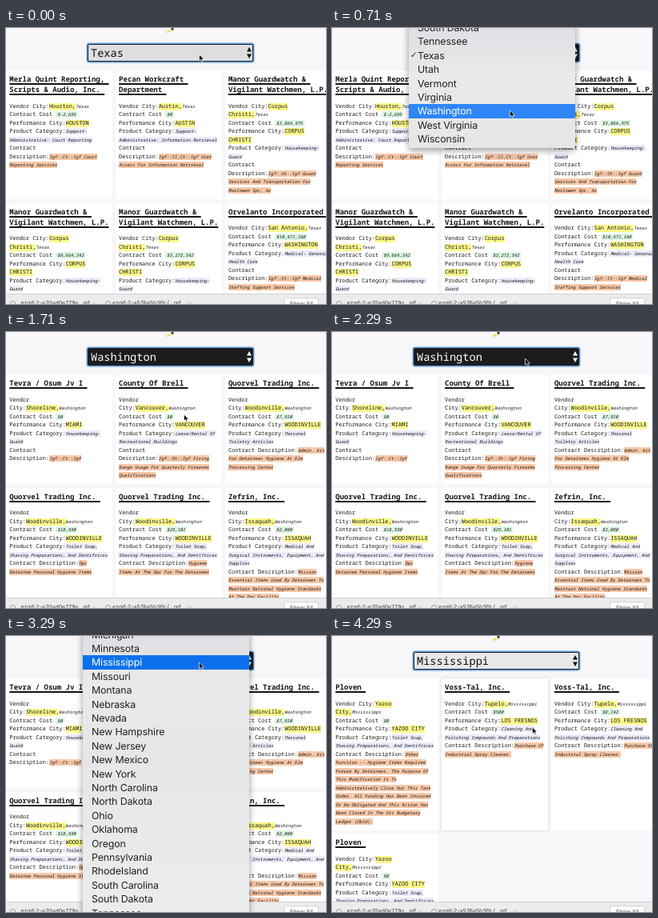
An HTML page for the animation above (4.44 s loop, 400 px wide and 345 px high).

```html
<!DOCTYPE html>
<html lang="en">
<head>
<meta charset="utf-8">
<title>Contracts by state</title>
<style>
html, body { margin: 0; width: 100%; height: 100%; overflow: hidden; }
body { position: relative; background: #f8f6f8; color: #161616; text-rendering: geometricPrecision; }
#stage { position: absolute; width: 400px; height: 345px; overflow: hidden; }
#stage div, #stage svg { position: absolute; }
#select { left: 102px; top: 20px; width: 205px; height: 20px; border: 1px solid #222; border-radius: 2px;
  box-shadow: 0 0 0 1.5px #5b9fde; font: 500 13.65px/20px "Noto Sans Mono", monospace; }
#select span { position: absolute; left: 3px; }
#select svg { left: 197px; top: 3px; }
.card { width: 128.5px; padding: 4px 0 0 4.3px; background: #fff; white-space: pre;
  font: 500 6.9px/10.5px "Noto Sans Mono", monospace; }
.card.lifted { box-shadow: 0 0 4px #0002; }
.card b { display: block; margin-bottom: 10.75px; font-size: 9px; font-weight: 600; line-height: 13px;
  text-decoration: underline 1.5px; text-underline-offset: 1.8px; text-decoration-skip-ink: none; }
.card span, .card i { line-height: 0; }
.card span { background: #fdf88c; }
.card i { font-size: 5.52px; }
.card .cost { background: #dcf6e2; padding: 0 2px; }
.card .kind { background: #ebebfa; }
.card .about { background: #f9c8a8; }
#bar { left: 0; top: 333px; width: 400px; height: 12px; background: #ececec; box-shadow: 0 -1px #d2d2d2;
  font: 7px/10px Inter, sans-serif; color: #444; }
#bar div { top: 6px; white-space: pre; }
#bar .button { left: 348px; top: 5px; width: 42px; height: 12px; border-radius: 2px; background: #fff;
  box-shadow: 0 0 0 .5px #bbb; text-align: center; line-height: 13px; }
#bar .file { left: 5px; width: 5px; height: 5px; top: 8px; border: 1px solid #999; border-radius: 50%; }
#menu { left: 96px; top: 0; width: 208px; overflow: hidden; border-radius: 0 0 4px 4px;
  background: linear-gradient(#dfdfe4, #eaeaeb 60px, #e6e6e7 150px, #ebedec 345px);
  font: 12.4px/17.4px Inter, sans-serif; letter-spacing: -.14px; color: #222; }
#shade { left: 96px; top: -10px; width: 208px; border-radius: 4px; box-shadow: 0 3px 9px #0006; }
#list div { left: 0; width: 197px; height: 17.4px; padding-left: 11px; white-space: pre; }
#list .hot { background: #0c70ee; color: #fff; }
#menu.bright .hot { background: #2e86f8; }
#list .checked::before { content: "✓"; position: absolute; left: 2px; font: 10px/17.4px "DejaVu Sans", sans-serif; }
#menu.blank #list div { color: transparent; }
</style>
</head>
<body>
<div id="stage">
  <svg width="12" height="8" style="left:200px;top:0"><path d="M1 5.5 6 3" stroke="#f2dc3c" stroke-width="2"/><path d="M6 0h4L8 4Z" fill="#333"/></svg>
  <div id="select"><span></span><svg width="8" height="14" fill="currentColor"><path d="M1 5.5 4 0l3 5.5ZM1 8.5h6L4 14Z"/></svg></div>
  <div id="pages"></div>
  <div id="bar">
    <div class="file"></div><div style="left:18.5px">ezgif-2-e70ad0e779s...gif</div><div style="left:107px">···</div>
    <div class="file" style="left:124px"></div><div style="left:133px">ezgif-2-a576a5b3fb (...gif</div><div style="left:226px">···</div>
    <div class="button">Show All</div>
  </div>
  <div id="shade"></div>
  <div id="menu"><div id="list"></div></div>
  <svg id="cursor" width="9" height="12" style="left:0;top:0;overflow:visible"><path d="M0 0V8L1.9 6.4 3.2 9.3 4.6 8.7 3.3 5.9H5.8Z" stroke="#fff" stroke-width=".7"/></svg>
</div>
<script>
const $ = id => document.getElementById(id);
const ROW = 17.4;
const states = ("Michigan,Minnesota,Mississippi,Missouri,Montana,Nebraska,Nevada,New Hampshire,New Jersey,New Mexico," +
  "New York,North Carolina,North Dakota,Ohio,Oklahoma,Oregon,Pennsylvania,RhodeIsland,South Carolina," +
  "South Dakota,Tennessee,Texas,Utah,Vermont,Virginia,Washington,West Virginia,Wisconsin").split(",");

const guards = "Manor Guardwatch & \nVigilant Watchmen, L.P.";
const trader = "Quorvel Trading Inc. ";
const soap = "Toilet Soap,\nShaving Preparations, And Dentifrices";
const polish = "Cleaning And\nPolishing Compounds And Preparations";
const guarding = "Housekeeping-\nGuard";
const prison = ["Ploven ", "Yazoo\nCity", "0", "YAZOO CITY", soap,
  "Other\nFunction -- Hygiene Items Required\nForuse By Detainees. The Purpose Of\nThis Modification Is To\n" +
  "Administratively Close Out This Task\nOrder. All Funding Has Been Invoiced\nOr De-Obligated And This Action Has\n" +
  "Been Closed In The Orv Budgetary\nLedger (Obld)."];

// Card fields: title, vendor city, cost, performance city, category, description.
// A leading line break in a value moves the break into its label.
const pages = [
  { state: "Texas", second: 218.5, cards: [
    ["Merla Quint Reporting, \nScripts & Audio, Inc. ", "Houston", "-2,695", "HOUSTON",
      "Support-\nAdministrative: Court Reporting", "\nIgf::Ct::Igf Court\nReporting Services"],
    ["Pecan Workcraft \nDepartment ", "Austin", "0", "AUSTIN",
      "Support-\nAdministrative: Information Retrieval", "\nIgf::Cl,Ct::Igf User\nAccess For Information Retrieval"],
    [guards, "Corpus\nChristi", "3,864,975", "CORPUS\nCHRISTI", guarding,
      "\nIgf::Ot::Igf Guard\nServices And Transportation For\nMarlowen Spc, Az"],
    [guards, "Corpus\nChristi", "9,664,342", "CORPUS\nCHRISTI", guarding, "\nIgf::Ot::Igf"],
    [guards, "Corpus\nChristi", "3,272,542", "CORPUS\nCHRISTI", guarding, "\nIgf::Ot::Igf"],
    ["Orvelanto Incorporated ", "San Antonio", "10,471,160", "WASHINGTON", "Medical- General\nHealth Care",
      "\nIgf::Ct::Igf Medical\nStaffing Support Services"]] },
  { state: "Washington", second: 194.5, cards: [
    ["Tevra / Osum Jv I ", "\nShoreline", "0", "MIAMI", guarding, "\nIgf::Ct::Igf"],
    ["County Of Brell ", "\nVancouver", "0", "VANCOUVER", "Lease/Rental Of\nRecreational Buildings",
      "\nIgf::Ot::Igf Firing\nRange Usage For Quarterly Firearms\nQualifications"],
    [trader, "\nWoodinville", "7,910", "WOODINVILLE", "Personal\nToiletry Articles",
      "Admin. Kit\nFor Detainees Hygiene At Dlm\nProcessing Center"],
    [trader, "\nWoodinville", "18,930", "WOODINVILLE", soap, "Dpc\nDetainee Personal Hygiene Items"],
    [trader, "\nWoodinville", "29,101", "WOODINVILLE", soap, "Hygiene\nItems At The Dpc For The Detainees"],
    ["Zefrin, Inc. ", "\nIssaquah", "2,080", "ISSAQUAH",
      "Medical And\nSurgical Instruments, Equipment, And\nSupplies",
      "Mission\nEssential Items Used By Detainees To\nMaintain National Hygiene Standards\nAt The Dpc Facility"]] },
  { state: "Mississippi", second: 247, cards: [
    prison,
    ["Voss-Tal, Inc. ", "Tupelo", "500", "LOS FRESNOS", polish, "Purchase Of\nIndustrial Spray Cleaner."],
    ["Voss-Tal, Inc. ", "Tupelo", "8,142", "LOS FRESNOS", polish, "Purchase Of\nIndustrial Spray Cleaner."],
    prison] }
];

const label = (first, last, value) => first + (value[0] === "\n" ? "\n" : " ") + last + ":";

function cardHTML({ state, second }, [title, city, cost, place, kind, about], i) {
  const low = i > 2;
  const box = `left:${136.8 * (i % 3)}px;top:${low ? second : 53}px;height:${low ? 140 : second - 61.5}px`;
  const lifted = state === "Mississippi" && i === 1 ? " lifted" : "";
  return `<div class="card${lifted}" style="${box}"><b>${title}</b>` +
    `${label("Vendor", "City", city)}<span>${city.trim()},</span><i> ${state}</i>\n`.replace("<i> ", "<i>") +
    `Contract Cost <i class="cost">$${cost}</i>\n` +
    `Performance City:<span>${place}</span>\n` +
    `Product Category:<i class="kind">${kind}</i>\n` +
    `${label("Contract", "Description", about)}<i class="about">${about.trim()}</i></div>`;
}

$("pages").innerHTML = pages.map(page =>
  `<div>${page.cards.map((card, i) => cardHTML(page, card, i)).join("")}</div>`).join("");
$("list").innerHTML = states.map((name, i) => `<div style="top:${i * ROW}px">${name}</div>`).join("");
const pageBoxes = [...$("pages").children];
const rows = [...$("list").children];

// Linear interpolation through [step, value] points.
function track(step, points) {
  const next = points.findIndex(p => p[0] > step);
  if (next < 0) return points[points.length - 1][1];
  const [a, from] = points[next - 1], [b, to] = points[next];
  return from + (to - from) * (step - a) / (b - a);
}

const LOOP = 4440, STEPS = 31;

function draw(step) {
  const current = step < 11 ? 0 : step < 28 ? 1 : 2;
  const { state } = pages[current];
  pageBoxes.forEach((box, i) => box.style.display = i === current ? "" : "none");

  const dark = track(step, [[0, .05], [2, 1], [12, 1], [14, 0], [15, 0], [16, 1], [27, 1], [29, 0]]);
  const gray = 232 - 204 * dark;
  $("select").style.background = `rgb(${gray},${gray},${gray})`;
  $("select").style.color = dark > .45 ? "#fff" : "#111";
  $("select").firstChild.textContent = state;

  const x = track(step, [[0, 241.5], [2, 241.5], [5, 222.5], [12, 222.5], [16, 241.5], [27, 241.5], [30, 250.5]]);
  const y = track(step, [[0, 33], [2, 33], [5, 103], [12, 103], [16, 33], [27, 33], [30, 114]]);
  $("cursor").style.transform = `translate(${x}px,${y}px)`;

  const open = step >= 2 && step < 8 || step >= 19 && step < 25;
  $("menu").style.display = $("shade").style.display = open ? "" : "none";
  if (!open) return;
  const blank = step === 19;
  const top = step < 8
    ? 34.5 - ROW * states.indexOf("Texas")
    : track(step, [[19, 35 - ROW * 25], [20, 35 - ROW * 25], [23, 33 - ROW * 2]]);
  const bottom = blank ? 90 : Math.min(360, top + ROW * (states.length - 1) + 11);
  const hot = Math.round((y - top) / ROW);
  $("menu").className = blank ? "blank" : current === 0 ? "bright" : "";
  $("menu").style.height = bottom + "px";
  $("shade").style.height = bottom + 10 + "px";
  $("list").style.top = top - ROW / 2 + "px";
  rows.forEach((row, i) => {
    row.classList.toggle("hot", i === hot);
    row.classList.toggle("checked", states[i] === state);
  });
}

const start = performance.now();
function tick() {
  const time = (performance.now() - start) % LOOP;
  draw(Math.min(STEPS - 1, Math.floor((time + 11) * STEPS / LOOP)));
  requestAnimationFrame(tick);
}
tick();
</script>
</body>
</html>
```
